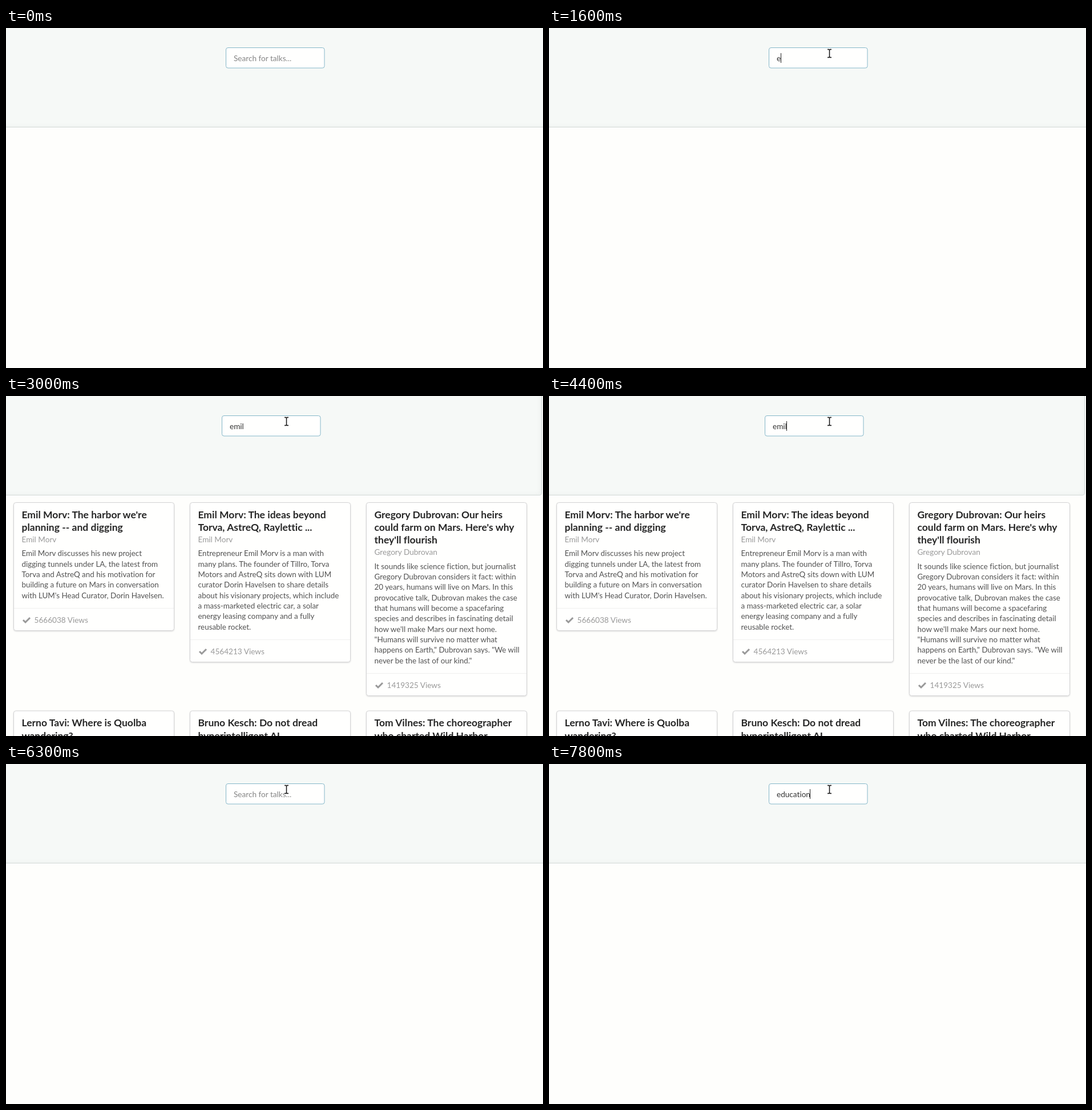
Write an HTML page that moves like this. It is 941 px wide and 595 px high and loops after 8 s.

```html
<!DOCTYPE html>
<html lang="en">
<head>
<meta charset="utf-8">
<title>Talk search</title>
<style>
  html, body { margin: 0; width: 100%; height: 100%; overflow: hidden; background: #fefefc; }
  body { position: relative; }
  #header {
    position: absolute; box-sizing: border-box; left: -10px; top: -20px; width: 963px; height: 194px;
    background: #f6f9f7; border: 1px solid #d2dad8; border-radius: 4px;
    box-shadow: inset 0 0 10px rgba(34, 36, 38, .05);
  }
  .results #header { width: 949px; }
  #scrollbar { position: absolute; left: 939px; top: 0; width: 2px; height: 595px; background: #f5f6f5; }
  svg { position: absolute; left: 0; top: 0; font: 13.6px Lato, sans-serif; font-variant-ligatures: none; }
  .card { fill: #fffffe; filter: drop-shadow(0 1px 1px #d9d9d9); stroke: #d4d4d5; }
  .title { font-size: 17.5px; font-weight: bold; fill: #262626; }
  .meta { fill: #999; }
  .text { font-size: 13.4px; fill: #525252; }
  .check { fill: none; stroke: #999; stroke-width: 3; }
  .rule { stroke: #f0f0ef; }
  .field { fill: #fffffe; stroke: #85b7c9; }
  #squiggle { fill: none; stroke: #e33; }
</style>
</head>
<body>
<div id="header"></div>
<div id="scrollbar"></div>
<svg width="941" height="595">
  <g id="cards"></g>
  <g id="search">
    <rect class="field" x="385.5" y="34.5" width="172.5" height="35.5" rx="3.5"/>
    <rect id="selection" x="399" y="44" height="17" fill="#c1c1c0"/>
    <text id="query" x="399" y="57.7"></text>
    <path id="squiggle" d="M399 61.5 l2 -2 l2 2 l2 -2 l2 2 l2 -2 l2 2 l2 -2 l2 2 l2 -2 l2 2 l2 -2 l2 2"/>
    <rect id="caret" y="44" width="1" height="17" fill="#222"/>
  </g>
  <g id="pointer">
    <path id="arrow" d="M0 0 V15 L3.5 12 L6 17.5 L8.5 16.5 L6 11 H10.5 Z" fill="#111" stroke="#fff"/>
    <g id="beam" fill="none">
      <path d="M-3.5 -7 H-1 L0 -6 L1 -7 H3.5 M0 -6 V6 M-3.5 7 H-1 L0 6 L1 7 H3.5" stroke="#fff" stroke-width="3"/>
      <path d="M-3.5 -7 H-1 L0 -6 L1 -7 H3.5 M0 -6 V6 M-3.5 7 H-1 L0 6 L1 7 H3.5" stroke="#111" stroke-width="1.5"/>
    </g>
  </g>
</svg>
<script>
const $ = id => document.getElementById(id);
const LOOP = 8000, TITLE_STEP = 22.3, TEXT_STEP = 18.33;

const talks = [
  { x: 13.5, y: 186.5, speaker: "Emil Morv", views: 5666038,
    title: ["Emil Morv: The harbor we're", "planning -- and digging"],
    text: ["Emil Morv discusses his new project", "digging tunnels under LA, the latest from",
      "Torva and AstreQ and his motivation for", "building a future on Mars in conversation",
      "with LUM's Head Curator, Dorin Havelsen."] },
  { x: 322.5, y: 186.5, speaker: "Emil Morv", views: 4564213,
    title: ["Emil Morv: The ideas beyond", "Torva, AstreQ, Raylettic ..."],
    text: ["Entrepreneur Emil Morv is a man with", "many plans. The founder of Tillro, Torva",
      "Motors and AstreQ sits down with LUM", "curator Dorin Havelsen to share details",
      "about his visionary projects, which include", "a mass-marketed electric car, a solar",
      "energy leasing company and a fully", "reusable rocket."] },
  { x: 631.5, y: 186.5, speaker: "Gregory Dubrovan", views: 1419325,
    title: ["Gregory Dubrovan: Our heirs", "could farm on Mars. Here's why", "they'll flourish"],
    text: ["It sounds like science fiction, but journalist", "Gregory Dubrovan considers it fact: within",
      "20 years, humans will live on Mars. In this", "provocative talk, Dubrovan makes the case",
      "that humans will become a spacefaring", "species and describes in fascinating detail",
      "how we'll make Mars our next home.", "\"Humans will survive no matter what",
      "happens on Earth,\" Dubrovan says. \"We will", "never be the last of our kind.\""] },
  { x: 13.5, y: 551, title: ["Lerno Tavi: Where is Quolba", "wandering?"] },
  { x: 322.5, y: 551, title: ["Bruno Kesch: Do not dread", "hyperintelligent AI"] },
  { x: 631.5, y: 551, title: ["Tom Vilnes: The choreographer", "who charted Wild Harbor"] },
];

const label = (kind, x, y, text) => `<text class="${kind}" x="${x}" y="${y}">${text}</text>`;
const lines = (kind, x, y, step, list) => list.map((s, i) => label(kind, x, y + i * step, s)).join("");

function card({ x, y, title, speaker, text = [], views }) {
  const left = x + 14;
  const metaY = y + 24.4 + title.length * TITLE_STEP;
  const textY = metaY + 24.9;
  const ruleY = Math.floor(textY + (text.length - 1) * TEXT_STEP + 17.8) + .5;
  let svg = `<rect class="card" x="${x}" y="${y}" width="281" height="${ruleY + 39 - y}" rx="4"/>`
    + lines("title", left, y + 27.3, TITLE_STEP, title);
  if (speaker) {
    svg += label("meta", left, metaY, speaker)
      + lines("text", left, textY, TEXT_STEP, text)
      + `<path class="rule" d="M${x + .5} ${ruleY} h280"/>`
      + `<path class="check" d="M${x + 16.5} ${ruleY + 20.5} l4 4 l8 -8"/>`
      + label("meta", x + 36, ruleY + 25.8, views + " Views");
  }
  return svg;
}
$("cards").innerHTML = talks.map(card).join("");

// [time, query, caret shown, results shown, selected, misspelling marked]
const states = [
  [0, "", 0], [600, "", 1], [1200, "", 0],
  [1600, "e", 1], [1700, "em", 1], [1900, "emi", 1], [2400, "emil", 1],
  [3000, "emil", 0, 1], [3200, "emil", 1, 1], [3800, "emil", 0, 1], [4400, "emil", 1, 1],
  [5000, "emil", 0, 1, 1], [5500, "emil", 0, 1, 1, 1], [5700, "", 1, 1], [6300, "", 0],
  [6700, "e", 1], [7100, "ed", 1], [7200, "edu", 1], [7300, "educ", 1], [7400, "educa", 1],
  [7600, "educat", 1], [7700, "educati", 1], [7800, "education", 1],
];
// [time, pointer shape, x, y]
const pointerStops = [
  [0, ""], [200, "arrow", 658, 2.5], [300, "beam", 540, 44.5], [400, "beam", 496.5, 42],
  [600, "beam", 493.5, 43], [700, "beam", 491.5, 44.5],
];

const at = (list, t) => list.findLast(item => item[0] <= t);
const show = (id, on) => { $(id).style.display = on ? "" : "none"; };

function draw() {
  const t = performance.now() % LOOP;
  const [, text, caret, results, selected, marked] = at(states, t);
  const query = $("query");
  query.textContent = text || "Search for talks...";
  query.setAttribute("fill", text ? "#333" : "#858585");
  const width = text ? query.getComputedTextLength() : 0;

  document.body.classList.toggle("results", !!results);
  show("cards", results);
  show("scrollbar", results);
  $("search").setAttribute("transform", `translate(${results ? -7 : 0})`);
  show("caret", caret);
  $("caret").setAttribute("x", 399 + Math.floor(width));
  show("selection", selected);
  $("selection").setAttribute("width", width);
  show("squiggle", marked);

  const [, shape, x = 0, y = 0] = at(pointerStops, t);
  show("arrow", shape === "arrow");
  show("beam", shape === "beam");
  $("pointer").setAttribute("transform", `translate(${x} ${y})`);
  requestAnimationFrame(draw);
}
draw();
</script>
</body>
</html>
```
